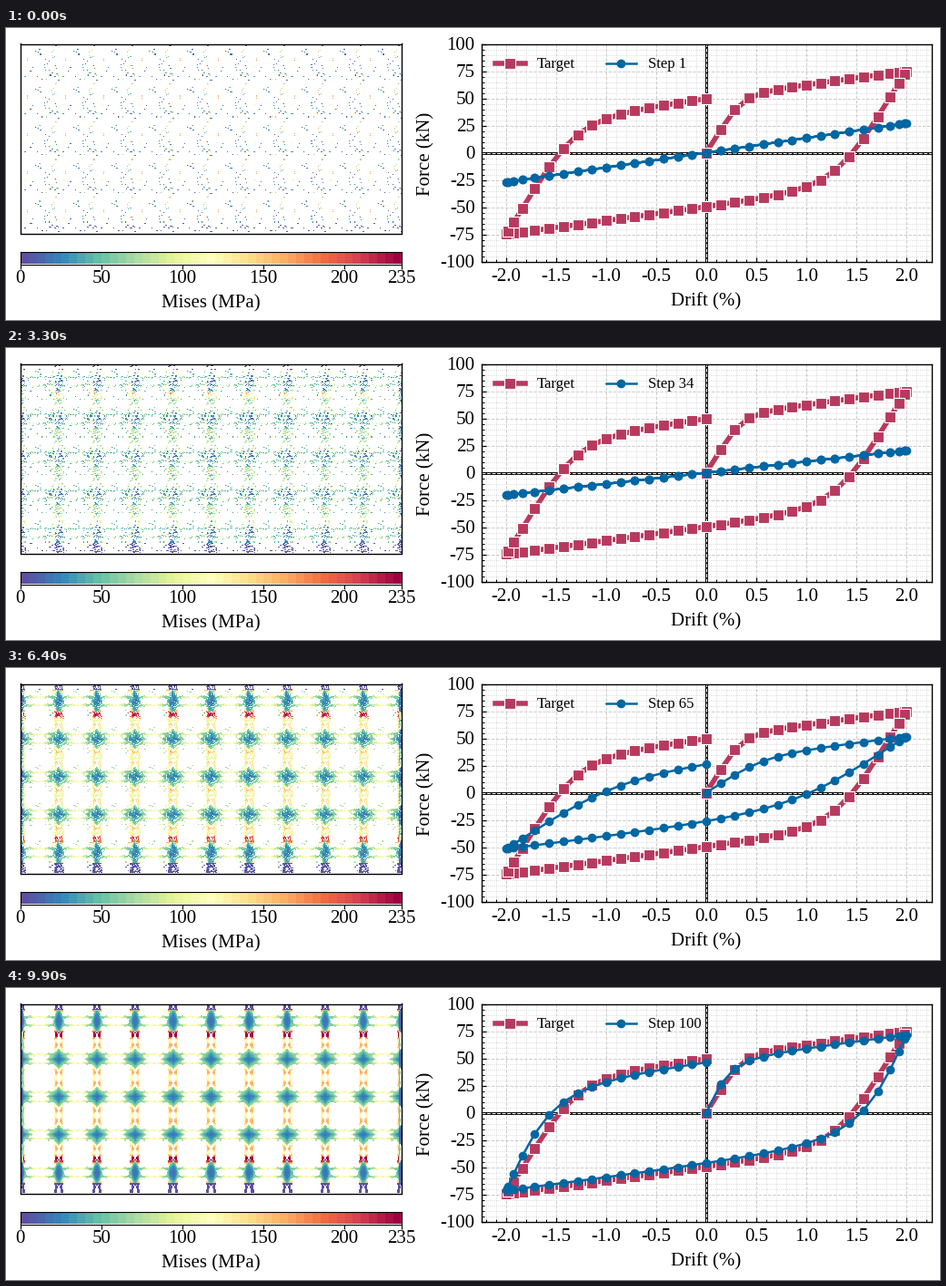
Recreate the animation shown at these times as a matplotlib script. Size 1027 by 322 pixels, loop 10 s.

```python
import numpy as np
import matplotlib.pyplot as plt
from matplotlib.animation import FuncAnimation
from matplotlib.ticker import AutoMinorLocator, MultipleLocator

W, H, DPI = 1027, 322, 100
STEPS = 100
LAST = 89                      # the design is converged from here on
YIELD = 41                     # the loop starts to open after this step
BLUE, RED = "#0067a3", "#b73a5e"
VMAX, BANDS = 235, 47

plt.rcParams.update({
    "font.family": "Liberation Serif",
    "font.size": 15,
    "axes.unicode_minus": False,
    "axes.linewidth": 1.0,
})


def smooth(x):
    x = np.clip(x, 0, 1)
    return x * x * (3 - 2 * x)


def opening(step):
    """0 while elastic, 1 once converged."""
    return np.clip((step - YIELD) / (LAST - YIELD), 0, 1)


# ---------------------------------------------------------------- hysteresis
# Evenly spaced drift that slows down at the turning point.
near = 2 - 0.01 * np.array([16, 7.4, 1.9, 0])
half = np.append(np.arange(13) / 7, near)
x_load, x_down, x_up = half, np.append(half[-2::-1], -half[1:]), -half[-2::-1]
drift = np.concatenate([x_load, x_down, x_up])


def loop(strength, bend, power, slope):
    """Masing loop: saturating backbone plus linear hardening."""
    def backbone(x):
        u = x / bend
        return strength * u / (1 + u ** power) ** (1 / power) + slope * x

    top = backbone(2)
    return np.concatenate([backbone(x_load),
                           top - 2 * backbone((2 - x_down) / 2),
                           -top + 2 * backbone((2 + x_up) / 2)])


def force(step):
    g = opening(step)
    return loop(strength=48 * g ** 0.7,
                bend=0.8 - 0.55 * g ** 1.6,
                power=3.2 - g ** 4,
                slope=9.2 + 0.03 * step + 4.3 * np.exp((1 - step) / 5))


goal = loop(strength=50, bend=0.37, power=4, slope=12.5)

# ---------------------------------------------------------------- lattice
CELL, N = 42, 40               # cell size in pixels, elements per cell
ROWS, COLS = 5, 10
rng = np.random.default_rng(4)
tile = rng.random((N, N))
tile = np.minimum(tile, np.roll(tile, 1, axis=1) * 1.8)
chance = np.tile(tile, (ROWS, COLS))
scatter = np.tile(rng.random((N, N)), (ROWS, COLS))

ys, xs = np.mgrid[0:ROWS * N, 0:COLS * N]
px, py = (xs + 0.5) * CELL / N, (ys + 0.5) * CELL / N
col = np.round(px / CELL)
row = np.clip(np.round((py - 19.5) / CELL), 0, ROWS - 1)
dx = np.abs(px - col * CELL)
side = py - 19.5 - row * CELL
dy = np.abs(side)
outer = (row == 0) | (row == ROWS - 1)
stub = ((row == 0) & (side < -12)) | ((row == ROWS - 1) & (side > 11))
edge = ((col == 0) | (col == COLS)) & (dx < 3)

# Joints, pairs of beams and pairs of legs.
star = (dx / 14) ** 0.85 + (dy / 12.5) ** 0.85
lens = (dx / 6) ** 1.5 + (dy / 14) ** 1.5
hub = np.where(outer, lens, star)
beam_gap = np.abs(dy - 4.7 - 0.6 * np.sin(dx * 0.75))
leg_gap = np.abs(dx - 3.3 - 0.7 * np.cos(dy * 0.6))
is_beam = (dx > 4) & (dy < 8)
is_leg = (dy > 8) & (dx < 7)
solid = ((hub < 1)
         | (is_beam & (beam_gap < 1.5 - 0.03 * dx))
         | (is_leg & (leg_gap < 1.4)))
soft = np.maximum.reduce([
    0.8 * np.exp(-(dx / 5) ** 2),
    0.8 * np.exp(-((dy - 4.7) / 1.1) ** 2),
    np.exp(-hub ** 2),
])

final = 18 + 57 * np.clip(hub, 0, 1) ** 2
final = np.where(is_beam & (hub > 0.9), 55 + 70 * smooth((dx - 5) / 15), final)
peak = np.where(outer, 150, 60)
final = np.where(is_leg & (hub > 0.95),
                 105 + peak * np.exp(-((dy - 15) / 4) ** 2), final)
final = np.where(edge, final * 0.35, final)
final = np.where(stub, 3, final)


def stress(step):
    t = step / LAST
    crisp = opening(step) ** 0.75
    order = 0.1 + 0.9 * smooth(t)
    level = 120 + 100 * t + 70 * np.exp((1 - step) / 5)
    loose = 0.016 + 0.65 * smooth((step - 8) / 54) * soft
    value = order * final + (1 - order) * level * scatter ** 3
    value = np.where(stub, np.minimum(value, 8), value)
    return np.ma.masked_where(chance >= (1 - crisp) * loose + crisp * solid,
                              value)


# ---------------------------------------------------------------- figure
fig = plt.figure(figsize=(W / DPI, H / DPI), dpi=DPI, facecolor="white")


def axes_px(left, top, right, bottom):
    return fig.add_axes([left / W, 1 - bottom / H,
                         (right - left) / W, (bottom - top) / H])


def label(x, y, text, **kw):
    fig.text(x / W, 1 - y / H, text, ha="center", va="baseline", **kw)


cmap = plt.get_cmap("Spectral_r", BANDS)

field_ax = axes_px(15.5, 17.5, 434.5, 226.5)
field = field_ax.imshow(stress(1), cmap=cmap, vmin=0, vmax=VMAX,
                        aspect="auto", interpolation="nearest")
field_ax.set_xticks([])
field_ax.set_yticks([])

bar_ax = axes_px(15.5, 246.5, 434.5, 260.5)
bar_ax.imshow(np.arange(BANDS)[None, :], cmap=cmap, aspect="auto",
              interpolation="nearest", extent=(0, VMAX, 0, 1))
bar_ax.set_xticks([*range(0, VMAX, 50), VMAX])
bar_ax.set_yticks([])
bar_ax.tick_params(length=3.5, width=0.8, pad=1.5)
for spine in bar_ax.spines.values():
    spine.set_linewidth(0.8)
label(225, 308, "Mises (MPa)")

ax = axes_px(522.5, 17.5, 1017.5, 257.5)
ax.set_xlim(-2.25, 2.25)
ax.set_ylim(-100, 100)
for axis, gap in ((ax.xaxis, 0.5), (ax.yaxis, 25)):
    axis.set_major_locator(MultipleLocator(gap))
    axis.set_minor_locator(AutoMinorLocator(5))
ax.set_axisbelow(True)
ax.tick_params(which="major", direction="in", length=3.5, width=0.9, pad=5)
ax.tick_params(which="minor", direction="in", length=2, width=0.7)
ax.tick_params(axis="x", which="major", pad=5.7)
ax.grid(which="major", color="#cccccc", lw=0.7, ls="--")
ax.grid(which="minor", color="#cccccc", lw=0.6, ls=":")
label(769.5, 306, "Drift (%)")
label(466.5, 138.5, "Force (kN)", rotation=90, rotation_mode="anchor")

for draw in (ax.axhline, ax.axvline):
    draw(0, color="black", lw=2.1, zorder=1.5)
    draw(0, color="white", lw=0.75, ls="--", zorder=1.6)

ax.plot(drift, goal, color=RED, lw=4, marker="s", ms=8.2, mec="white",
        mew=0.8, label="Target", zorder=3)
curve, = ax.plot(drift, force(1), color=BLUE, lw=1.8, marker="o", ms=6,
                 label="Step 1", zorder=4)
legend = ax.legend(loc="upper left", ncol=2, fontsize=12, frameon=False)
step_text = legend.get_texts()[1]


def update(i):
    step = i + 1
    shown = min(step, LAST)
    field.set_data(stress(shown))
    curve.set_ydata(force(shown))
    step_text.set_text(f"Step {step}")
    return field, curve, step_text


anim = FuncAnimation(fig, update, frames=STEPS, interval=100,
                     repeat=True, repeat_delay=0, blit=False)
plt.show()
```
